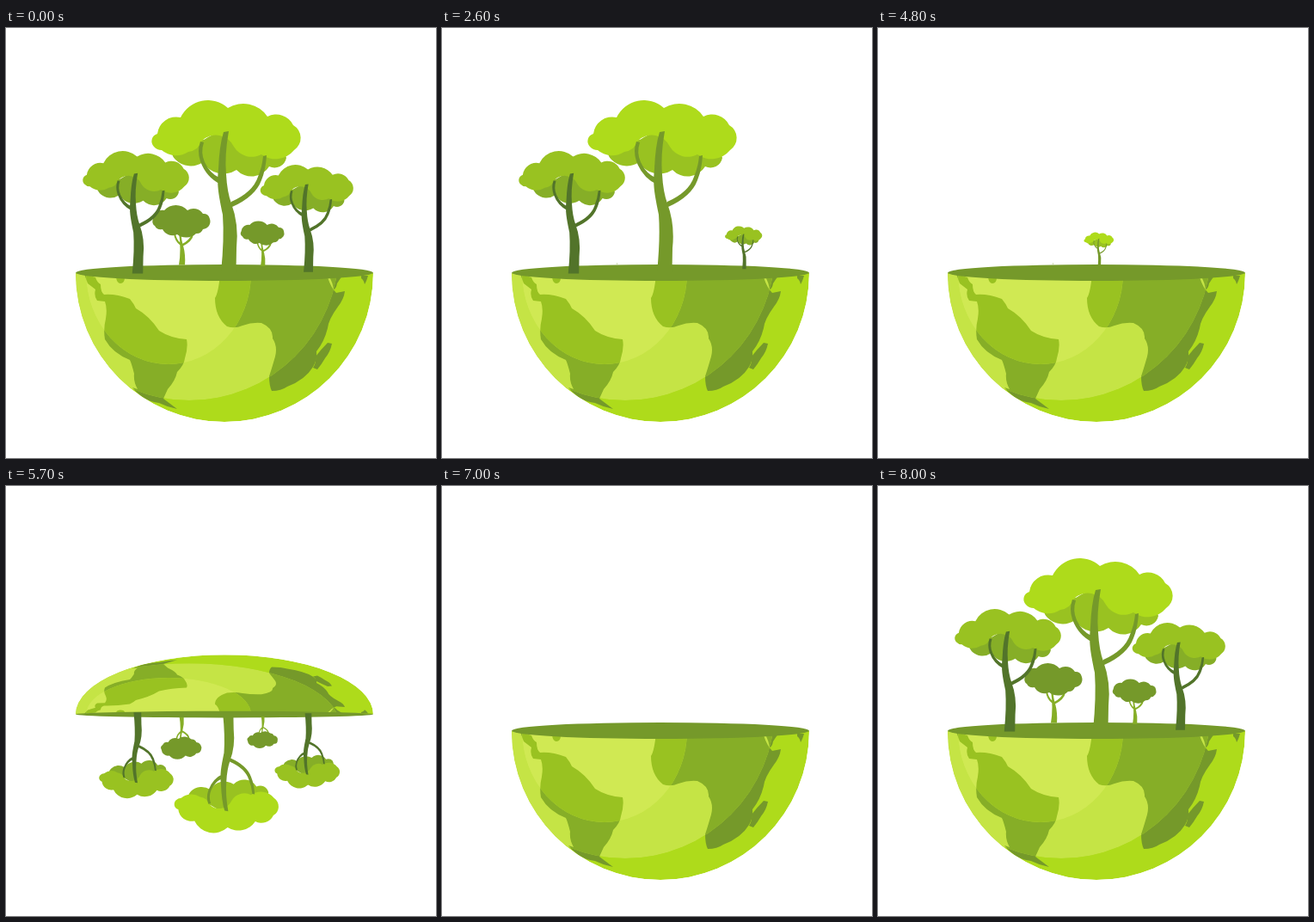
Animation of 500 by 500 pixels, one loop 9000 ms. Source, as an HTML page:

```html
<!DOCTYPE html>
<html lang="en">
<head>
<meta charset="utf-8">
<title>Green globe</title>
<style>
  html, body { margin: 0; width: 100%; height: 100%; overflow: hidden; background: #fff; }
  svg { display: block; width: 100vw; height: 100vh; }
</style>
</head>
<body>
<svg viewBox="0 0 500 500" xmlns="http://www.w3.org/2000/svg">
  <defs>
    <path id="half" d="M81 285A173 173 0 0 0 427 285Z"/>
    <circle id="mid" cx="213" cy="259" r="174"/>
    <ellipse id="inner" cx="189" cy="285" rx="96" ry="106"/>
    <clipPath id="inHalf"><use href="#half"/></clipPath>
    <clipPath id="inMid"><use href="#mid"/></clipPath>
    <clipPath id="inInner"><use href="#inner"/></clipPath>
    <g id="land">
      <path d="M91 286L104 290Q106 296 110 298Q110 307 114 310Q128 309 144 315Q149 321 151 326Q167 335 178 352Q192 361 210 362
        Q212 371 208 384Q207 392 199 400Q197 410 188 420L183 431L199 443Q188 441 178 436Q160 434 147 418L153 420
        Q148 411 149 402Q146 390 144 386Q124 378 115 362Q113 350 116 338Q118 326 115 318L106 317Q102 312 104 304L95 297Z"/>
      <path d="M128 290H138Q138 297 133 297Q129 297 128 290Z"/>
      <path d="M249 286Q247 308 243 314Q243 336 257 347Q266 350 275 346Q286 342 297 343Q311 349 310 361Q316 370 313 382
        Q309 396 306 405Q306 416 309 422Q320 422 327 417Q348 409 357 394Q362 386 361 376Q370 365 374 349
        Q375 339 386 324Q393 315 394 306L384 308Q378 302 374 290L372 286Z"/>
      <path d="M377 288H391Q387 294 385 297Q384 303 381 304Q380 297 377 291Z"/>
      <path d="M413 288H421Q419 295 417 298Q416 293 413 291Z"/>
      <path d="M357 395Q361 389 360 382Q366 374 374 366L379 367Q377 377 371 384Q367 391 362 397Z"/>
    </g>
  </defs>
  <g id="globe">
    <g clip-path="url(#inHalf)">
      <use href="#half" fill="#aedb1b"/>
      <use href="#land" fill="#75992a"/>
      <g clip-path="url(#inMid)">
        <use href="#mid" fill="#c5e445"/>
        <use href="#land" fill="#86ae27"/>
      </g>
      <g clip-path="url(#inInner)">
        <use href="#inner" fill="#d0e953"/>
        <use href="#land" fill="#99c221"/>
      </g>
    </g>
    <ellipse cx="254" cy="284.5" rx="173" ry="9.5" fill="#75992a"/>
  </g>
  <g id="trees"></g>
</svg>
<script>
const LOOP = 9000, STEP = 100, AXIS = 271;
const globe = document.getElementById('globe');
const grove = document.getElementById('trees');

// Closed outline of arcs: [x, y, radius of the arc that arrives there]; a negative radius bends inward.
function lobes(points) {
  const last = points[points.length - 1];
  return `M${last[0]} ${last[1]}` + points.map(([x, y, r]) =>
    `A${Math.abs(r)} ${Math.abs(r)} 0 0 ${r > 0 ? 1 : 0} ${x} ${y}`).join('') + 'Z';
}

const BACK = lobes([[193, 144, 12], [230, 130, 60], [310, 140, 60], [326, 151, 14], [306, 161, 14],
  [268, 165, 24], [229, 156, 28], [197, 153, 25]]);
const FRONT = lobes([[176, 123, 9], [203, 104, 22], [258, 93, 35], [304, 103, 34], [334, 113, 22],
  [335, 142, 17], [297, 147, 28], [265, 138, 24], [228, 131, -23], [212, 144, 20], [181, 142, 26], [172, 138, 12]]);
const BUSH = lobes([[171, 222, 6], [184, 212, 11], [211, 212, 18], [229, 216, 13], [237, 222, 7],
  [229, 234, 9], [221, 239, 8], [199, 240, 17], [182, 234, 13], [173, 230, 8]]);

const TRUNK = 'M250 284Q254 245 252 217C247 192 245 183 247 164Q248 137 253 121L259 120' +
  'Q254 148 256 170Q257 190 262 204Q271 228 268 256L267.5 284Z';
const LIMBS = 'M260 209Q261 205 262 202Q287 191 293 173Q298 161 299 149L303 148Q302 165 297 177Q290 196 263 208Z' +
  'M250 182Q233 174 226 155Q222 143 226 132L230 133Q226 145 231 156Q237 169 248 174Z';
const STEM = 'M201 275.4Q204 258 201 238H203.5Q204 247 206 253Q209 264 208 275.4Z' +
  'M205 254V251Q213 247 216 240H218Q217 248 205 254Z' +
  'M203 253Q196 248 195 239H197Q198 246 203 250Z';

const shape = (d, fill) => `<path d="${d}" fill="${fill}"/>`;
const tall = (front, back, wood) =>
  shape(BACK, back) + shape(FRONT, front) + shape(TRUNK + LIMBS, wood);
const bush = shape(STEM, '#86ae27') + shape(BUSH, '#75992a');
const place = (art, x, y, s, x0, y0) =>
  `<g transform="translate(${x} ${y}) scale(${s}) translate(${-x0} ${-y0})">${art}</g>`;

// In the order they shrink; (x, y) is the point each tree shrinks to.
const small = tall('#99c221', '#86ae27', '#52742a');
const trees = [
  { x: 298.5, y: 275.5, art: place(bush, 272, 226, .752, 169, 208) },
  { x: 203.5, y: 275, min: .02, art: bush },
  { x: 351.3, y: 278, art: place(small, 295.5, 159, .624, 169, 84) },
  { x: 152.5, y: 279.5, art: place(small, 89, 143, .713, 169, 84) },
  { x: 257, y: 276, art: tall('#aedb1b', '#99c221', '#75992a') }
];
for (const tree of trees) {
  tree.el = document.createElementNS('http://www.w3.org/2000/svg', 'g');
  tree.el.innerHTML = tree.art;
  grove.appendChild(tree.el);
}

function setMatrix(el, sx, sy, tx, ty) {
  el.setAttribute('transform', `matrix(${sx} 0 0 ${sy} ${tx} ${ty})`);
}

function draw(time) {
  const n = Math.floor((time % LOOP) / STEP);
  const phase = n === 0 ? 0 : Math.floor((n - 1) / 10);
  const u = (n - phase * 10) / 10;

  // Half turn of the globe, then back again
  const turn = phase === 5 ? 1 - 2 * u : phase === 6 ? 2 * u - 1 : 1;
  setMatrix(globe, 1, turn, 0, AXIS * (1 - turn));

  const lean = phase === 6 ? turn : 1;
  setMatrix(grove, 1, lean, 0, AXIS * (1 - lean));
  grove.setAttribute('opacity', phase === 6 ? 1 - u : phase === 7 ? u : 1);

  trees.forEach(({ el, x, y, min = 0 }, i) => {
    if (phase < 5) {
      const s = i < phase ? min : i === phase ? Math.max(min, 1 - u) : 1;
      setMatrix(el, s, s, x * (1 - s), y * (1 - s));
    } else if (phase === 5) {
      setMatrix(el, u, -u, x * (1 - u), y * (1 - u) + 2 * AXIS * u);
    } else {
      setMatrix(el, 1, 1, 0, 0);
    }
  });
}

function tick() {
  draw(performance.now());
  requestAnimationFrame(tick);
}
tick();
</script>
</body>
</html>
```
